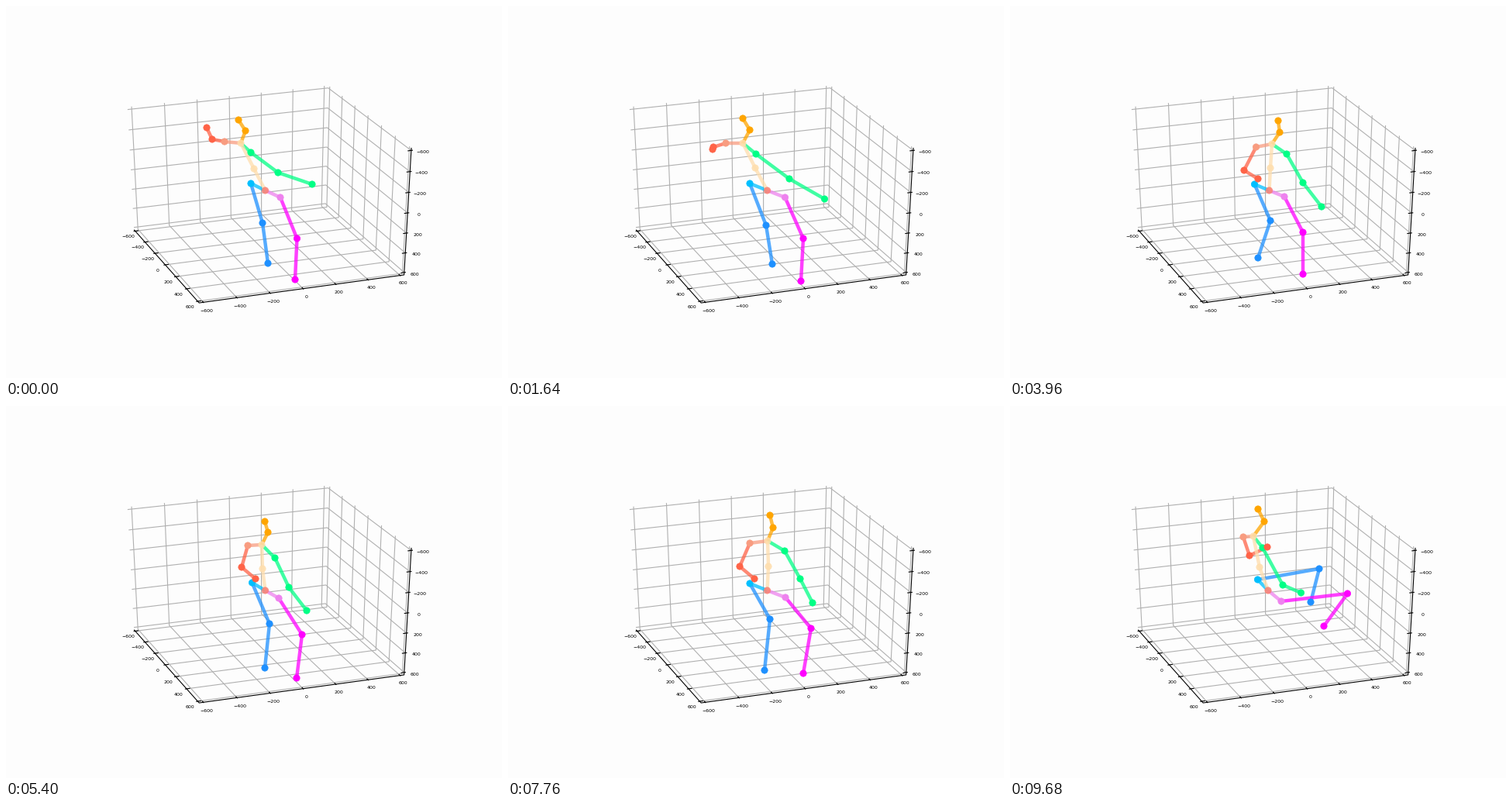
Animation, 640 px wide and 480 px high, one loop 9720 ms. Source, as a matplotlib script:

```python
import numpy as np
import matplotlib.pyplot as plt
from matplotlib.animation import FuncAnimation
from matplotlib.collections import LineCollection

W, H, DPI = 640, 480, 100
FRAMES, STEP = 243, 40
BACK = "#fdfdfd"
AZIM, ELEV, DIST = np.radians(20), np.radians(30), 10
CENTER = (335, 238.5)
SCALE = (278.5, 186)

fig = plt.figure(figsize=(W / DPI, H / DPI), dpi=DPI, facecolor=BACK)
ax = fig.add_axes([0, 0, 1, 1])
ax.set_xlim(0, W)
ax.set_ylim(H, 0)
ax.axis("off")


def project(x, y, z):
    """Map a point of the unit cube to the stage, in perspective."""
    right = x * np.cos(AZIM) + y * np.sin(AZIM)
    near = y * np.cos(AZIM) - x * np.sin(AZIM)
    up = z * np.cos(ELEV) - near * np.sin(ELEV)
    k = DIST / (DIST - near * np.cos(ELEV) - z * np.sin(ELEV))
    return CENTER[0] + SCALE[0] * right * k, CENTER[1] - SCALE[1] * up * k


def path(*points):
    return [project(*p) for p in points]


def draw_box():
    e, out = 0.5, 0.538          # cube edge, label distance
    t0, t1 = 0.508, 0.483        # tick ends
    grid, ticks = [], []
    for value in range(-600, 601, 200):
        u = value / 1250
        grid += [path((u, e, -e), (u, -e, -e), (u, -e, e)),
                 path((-e, u, -e), (e, u, -e), (e, u, e)),
                 path((-e, -e, -u), (e, -e, -u), (e, e, -u))]
        ticks += [path((u, t0, -e), (u, t1, -e)),
                  path((-t0, u, -e), (-t1, u, -e)),
                  path((t0, e, -u), (t1, e, -u))]
        spots = path((u, out + 0.003, -out - 0.003), (-out, u, -out),
                     (out, out, -u))
        for x, y in spots:
            ax.text(x, y, str(value).replace("-", "\u2212"), fontsize=4.5,
                    family="DejaVu Sans", ha="center", va="center")
    edges = path((-e, -e, -e), (-e, e, -e), (e, e, -e), (e, e, e))
    ax.add_collection(LineCollection(grid, colors="#b0b0b0", linewidths=0.8))
    ax.add_collection(LineCollection(ticks + [edges], colors="black",
                                     linewidths=0.8))


# Stage positions of the joints at the main poses
POSE_TIMES = [0, 1640, 2800, 3960, 5400, 7760, 9680]
LEGS = {
    "r_hip": [(316, 229), (312, 229), (316, 229), (315.5, 230), (317.5, 228),
              (312, 229), (319.5, 224)],
    "r_knee": [(331, 280), (333, 283), (332, 283), (336, 277), (340, 281),
               (338, 275), (399, 210)],
    "r_ankle": [(338, 332), (341, 333), (322, 335), (320, 325), (334, 338),
                (331, 341), (388, 253)],
    "l_hip": [(354, 247), (357.5, 247), (354, 247), (354, 246), (352, 248),
              (358, 247), (350, 252)],
    "l_knee": [(375.5, 300), (381, 300), (383, 297), (378, 292), (382, 295),
               (391, 287), (435.5, 242)],
    "l_ankle": [(373, 353), (378, 355), (382, 356), (378, 346), (375, 351),
                (381, 345), (405, 284)],
}
TRUNK = {
    "pelvis": [(334.5, 238)] * 6 + [(333, 238)],
    "spine": [(320, 210), (319, 209), (330, 209), (336, 209), (331, 210),
              (336, 207), (322, 208)],
    "chest": [(303, 177), (303, 177), (329, 179), (338, 178), (330, 179),
              (335, 174), (314, 168)],
    "nose": [(309, 161), (312, 160), (339, 162), (348, 163), (338, 163),
             (342, 157), (328, 149)],
    "head": [(300, 147), (303, 145), (335, 148), (346, 148), (334, 149),
             (338, 141), (320, 133)],
}
ARMS = {
    "l_shoulder": [(316, 189), (320, 191), (346, 195), (357, 191), (347, 196),
                   (357, 187), (326, 183)],
    "l_elbow": [(351, 215), (363, 223), (366, 234), (378, 228), (365, 234),
                (377, 223), (352, 231)],
    "l_wrist": [(395, 230), (408.5, 249), (396, 266), (402, 259), (388, 264),
                (393, 254), (375.5, 241)],
    "r_shoulder": [(282, 175), (281, 177), (310, 180), (317.5, 182), (312, 180),
                   (312, 177), (301, 169)],
    "r_elbow": [(266, 172), (265, 182), (302, 208), (302, 212), (304, 208),
                (299, 207), (309, 193)],
    "r_wrist": [(259, 157), (264, 185), (322, 217), (320, 223), (322, 223),
                (318, 223), (332, 182)],
}
# Quick swings between the main poses
SWINGS = {
    "r_wrist": {640: (247, 160), 2040: (275, 201), 9040: (326, 195)},
    "r_elbow": {640: (262, 173), 2040: (271, 190), 4600: (299.5, 210),
                6200: (299.5, 208), 8400: (292, 206), 9040: (296, 198)},
    "l_wrist": {800: (410, 239), 2040: (407, 256), 6000: (393, 260)},
    "l_ankle": {2300: (383, 359), 8040: (383, 341), 9040: (399, 304)},
    "r_ankle": {8040: (337, 336), 9040: (382, 271)},
    "l_knee": {9000: (428, 248)},
    "r_knee": {9000: (391, 217)},
}

COLORS = {
    "pelvis": "salmon", "spine": "navajowhite", "chest": "navajowhite",
    "nose": "orange", "head": "orange",
    "r_hip": "deepskyblue", "r_knee": "dodgerblue", "r_ankle": "dodgerblue",
    "l_hip": "violet", "l_knee": "magenta", "l_ankle": "magenta",
    "l_shoulder": "#00ff85", "l_elbow": "#00ff85", "l_wrist": "#00ff85",
    "r_shoulder": "#f89c80", "r_elbow": "tomato", "r_wrist": "tomato",
}
CHAINS = [
    ["pelvis", "r_hip", "r_knee", "r_ankle"],
    ["pelvis", "l_hip", "l_knee", "l_ankle"],
    ["chest", "l_shoulder", "l_elbow", "l_wrist"],
    ["chest", "r_shoulder", "r_elbow", "r_wrist"],
    ["pelvis", "spine", "chest", "nose", "head"],
]
BONES = [pair for chain in CHAINS for pair in zip(chain, chain[1:])]


def glide(times, points, t):
    """Smooth cubic through the points, without overshoot."""
    times, points = np.array(times, float), np.array(points, float)
    h = np.diff(times)[:, None]
    slope = np.diff(points, axis=0) / h
    a, b = slope[:-1], slope[1:]
    same = a * b > 0
    inner = np.where(same, 2 * a * b / np.where(same, a + b, 1), 0)
    m = np.vstack([slope[:1], inner, slope[-1:]])
    i = np.clip(np.searchsorted(times, t, side="right") - 1, 0, len(h) - 1)
    h = h[i]
    u = ((t - times[i]) / h[:, 0])[:, None]
    return ((1 + 2 * u) * (1 - u) ** 2 * points[i] + u * (1 - u) ** 2 * h * m[i]
            + u * u * (3 - 2 * u) * points[i + 1]
            + u * u * (u - 1) * h * m[i + 1])


def build_track(name, poses):
    keys = dict(zip(POSE_TIMES, poses))
    keys.update(SWINGS.get(name, {}))
    times = sorted(keys)
    return glide(times, [keys[t] for t in times], np.arange(FRAMES) * STEP)


tracks = {name: build_track(name, poses)
          for part in (LEGS, TRUNK, ARMS) for name, poses in part.items()}

draw_box()
bones = LineCollection([], colors=[COLORS[end] for _, end in BONES],
                       linewidths=3.2, alpha=0.75, zorder=3)
ax.add_collection(bones)
joints = ax.scatter([0] * len(COLORS), [0] * len(COLORS), s=36, linewidths=0.5,
                    c=list(COLORS.values()), zorder=4)
# Trunk joints are paler than the limbs
joints.set_alpha([0.85 if n in ("spine", "chest", "pelvis") else 1
                  for n in COLORS])


def update(i):
    bones.set_segments([[tracks[a][i], tracks[b][i]] for a, b in BONES])
    joints.set_offsets([tracks[name][i] for name in COLORS])
    return bones, joints


anim = FuncAnimation(fig, update, frames=FRAMES, interval=STEP, repeat=True,
                     repeat_delay=0)
plt.show()
```
